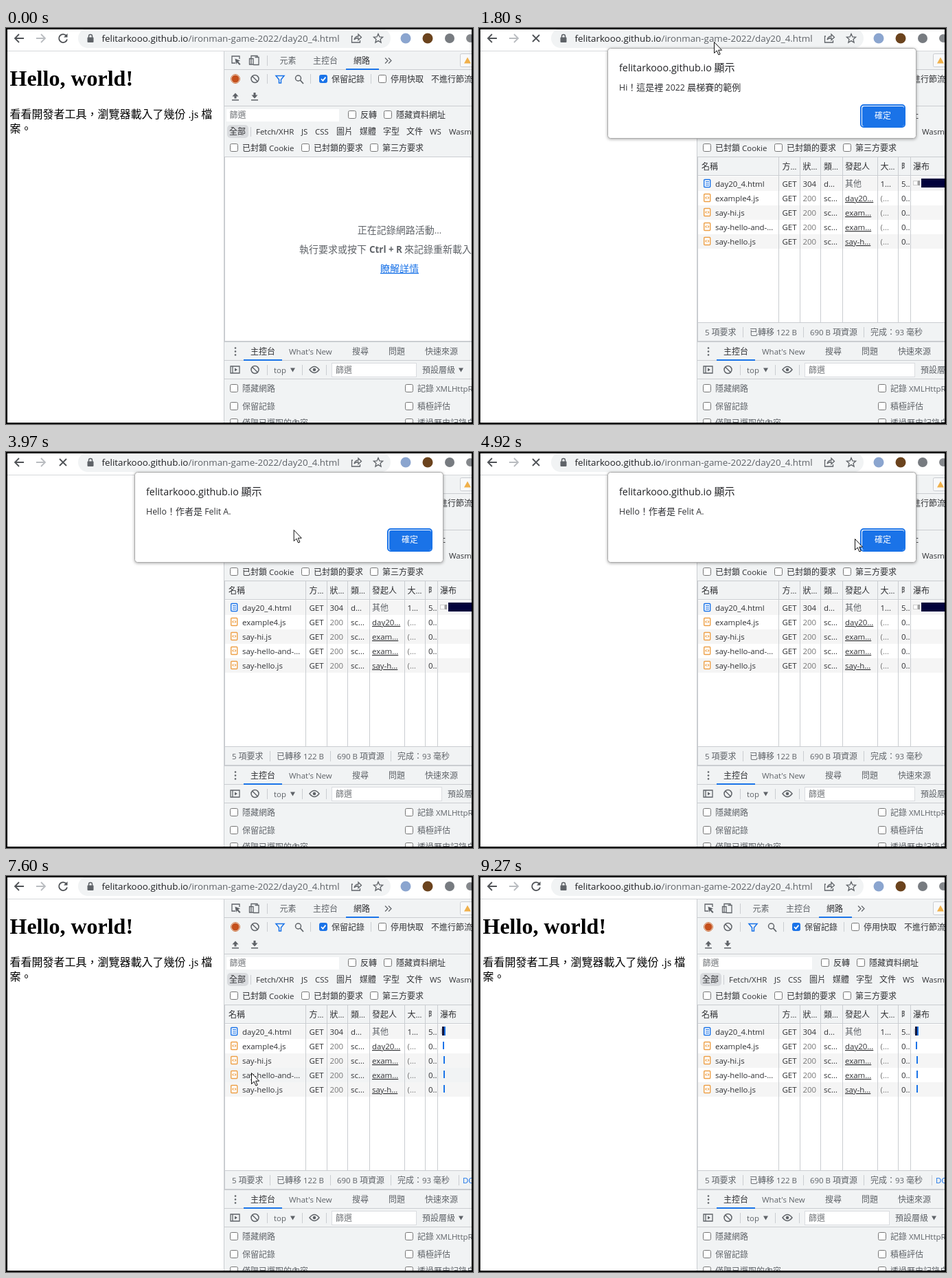
An HTML page that plays this animation: 680x576 px, repeating every 9.75 s.

```html
<!DOCTYPE html>
<html lang="zh-Hant">
<head>
<meta charset="utf-8">
<title>Network panel demo</title>
<style>
  html, body { margin: 0; width: 100%; height: 100%; overflow: hidden; background: #fff; }
  svg { display: block; }
  text { white-space: pre; font-family: "Noto Sans CJK TC", "Noto Sans CJK", sans-serif; }
  tspan { font-family: "Open Sans", "Noto Sans", sans-serif; font-size: .955em; }
  .serif tspan { font-family: "Liberation Serif", serif; font-size: 1em; }
</style>
</head>
<body>
<svg id="stage" width="680" height="576" viewBox="0 0 680 576"></svg>
<script>
const LOOP = 9750;
const BAR = '#f1f3f4', LINE = '#cacdd1', INK = '#303134', GREY = '#5f6368', BLUE = '#1a73e8';
const HOST = 'felitarkooo.github.io';

// Latin runs get their own face and a slightly smaller size
const text = (x, y, s, fill = INK, size = 12, extra = '') =>
  `<text x="${x}" y="${y}" fill="${fill}" font-size="${size}" ${extra}>` +
  s.replace(/[ -~…]+/g, '<tspan>$&</tspan>') + '</text>';
const rect = (x, y, w, h, fill, extra = '') =>
  `<rect x="${x}" y="${y}" width="${w}" height="${h}" fill="${fill}" ${extra}/>`;
const path = (d, stroke = GREY, width = 1.4, extra = 'fill="none"') =>
  `<path d="${d}" stroke="${stroke}" stroke-width="${width}" ${extra}/>`;
const solid = (d, fill = GREY) => path(d, 'none', 0, `fill="${fill}"`);
const dot = (x, y, r, fill, extra = '') => `<circle cx="${x}" cy="${y}" r="${r}" fill="${fill}" ${extra}/>`;
const ring = (x, y, r, stroke = GREY, width = 1.5) =>
  dot(x, y, r, 'none', `stroke="${stroke}" stroke-width="${width}"`);
const group = (id, ...parts) => `<g id="${id}">${parts.join('')}</g>`;
const vline = (x, y, h) => rect(x, y, 1, h, LINE);
const hline = (y, h = 1) => rect(318, y, 360, h, LINE);
const noEntry = (x, y) => ring(x, y, 5.5) + path(`M${x - 4} ${y - 4}l8 8`);

const check = (x, y, label, on, fill = INK) =>
  rect(x + .5, y - 5.5, 11, 11, on ? BLUE : '#fff', `rx="2" stroke="${on ? BLUE : '#767676'}"`) +
  (on ? path(`M${x + 3} ${y}l2.4 2.6 4-5`, '#fff', 1.7) : '') +
  text(x + 18, y + 4.5, label, fill);

function toolbar() {
  return rect(2, 2, 676, 31, '#fff') + rect(2, 33, 676, 1, '#d6d8db') +
    rect(105, 1, 455, 28, BAR, 'rx="14" id="pill"') +
    path('M26 15H13m6-6l-6 6 6 6', '#4f5256', 1.8) +
    path('M44 15h13m-6-6l6 6-6 6', '#b9bcc0', 1.8) +
    group('reload', path('M88 11.5a6 6 0 1 0 1 5', '#4f5256', 1.8), solid('M89.5 8v5.5h-5.5z', '#4f5256')) +
    group('stop', path('M78 10l10 10m0-10l-10 10', '#4f5256', 1.8)) +
    rect(118.5, 13.5, 9, 7.5, GREY, 'rx="1"') + path('M120.5 14v-2a2.5 2.5 0 0 1 5 0v2', GREY, 1.5) +
    text(139.5, 20, HOST, '#202124', 14) +
    text(265.5, 20, '/ironman-game-2022/day20_4.html', GREY, 14) +
    path('M505 12h-1.5v9h12v-3M507 17q1-5 6-5v-3l4.5 4.5-4.5 4v-3q-4 0-6 2.5z', GREY, 1.3) +
    path('M542 8.5l1.9 4.4 4.7.4-3.6 3.1 1.1 4.7-4.1-2.5-4.1 2.5 1.1-4.7-3.6-3.1 4.7-.4z', GREY, 1.3) +
    dot(582, 15, 7.5, '#8ba5cf') + dot(614, 15, 7.5, '#6b431d') +
    dot(646, 15, 7, '#777b80') + dot(676, 15, 6, '#85888c');
}

function page() {
  return text(5.5, 84, 'Hello, world!', '#000', 32, 'class="serif" font-weight="700"') +
    text(5.5, 131, '看看開發者工具，瀏覽器載入了幾份 .js 檔', '#000', 16, 'class="serif"') +
    text(5.5, 152, '案。', '#000', 16);
}

function panel() {
  let s = rect(317, 34, 361, 540, BAR) + rect(319, 188, 359, 268, '#fff');
  // tabs
  s += path('M334 51h-5v-10h11v4', GREY, 1.3) + solid('M333.5 44.5l7.5 3-3 1.3 3.5 3.7-1.5 1.4-3.5-3.7-1.4 2.8z') +
    path('M357 52.5v-12h9v2M354.5 44.5h5.5v8.5h-5.5zM362.5 42.5h5.5v11h-8', GREY, 1.3) + vline(380, 40, 15) +
    text(398.5, 52, '元素', GREY) + text(447, 52, '主控台', GREY) + text(506, 52, '網路') +
    path('M552 43.5l4 4-4 4m5-8l4 4-4 4', GREY, 1.2) +
    rect(661.5, 37.5, 30, 19, '#f8f9fa', `stroke="${LINE}" rx="2"`) +
    solid('M672 42.5l5 9h-10z', '#f0b04a') + hline(60) + rect(495, 59, 48, 2, BLUE);
  // record bar
  s += dot(334, 74, 5.5, '#c5501c') + ring(334, 74, 6.5, '#d2763f', 1) + noEntry(362.5, 74) + vline(380, 67, 14) +
    path('M393 69.5h12l-4.5 5.5v5h-3v-5z', BLUE, 1.5) + ring(425.5, 73, 4) + path('M428.5 76l4.5 5', GREY, 1.8) + vline(443, 67, 14) +
    check(456, 74, '保留記錄', true) + vline(531, 67, 14) + check(542, 74, '停用快取') + text(619, 78.5, '不進行節流') +
    solid('M334 94.5l4.5 5h-3v3h-3v-3h-3z') + rect(329, 104, 10, 1.5, GREY) +
    solid('M362 102.5l4.5-5h-3v-3.5h-3v3.5h-3z') + rect(357, 104, 10, 1.5, GREY) + hline(113);
  // filters
  s += rect(321, 118, 164, 18, '#fff') + text(325.5, 131, '篩選', '#707377') +
    check(498, 126, '反轉') + check(550, 126, '隱藏資料網址') +
    rect(322, 141, 31, 19, '#d9dbde', 'rx="5"') + text(325, 155, '全部') + vline(356, 144, 14);
  [[364, 'Fetch/XHR'], [430, 'JS'], [450, 'CSS'], [481, '圖片'], [515, '媒體'], [549, '字型'], [583, '文件'], [617, 'WS'], [645, 'Wasm']]
    .forEach(([x, label]) => s += text(x, 155, label));
  s += check(326, 174, '已封鎖 Cookie') + check(430, 174, '已封鎖的要求') + check(530, 174, '第三方要求') + hline(187);
  // drawer
  s += hline(455, 2) + [465.5, 470.5, 475.5].map(y => dot(334, y, 1.3, GREY)).join('') +
    text(356, 475, '主控台') + text(412, 475, "What's New", GREY) + text(504, 475, '搜尋', GREY) +
    text(557, 475, '問題', GREY) + text(610, 475, '快速來源', GREY) + hline(483) + rect(346, 482, 56, 2, BLUE) +
    path('M327 492h13v10h-13zM330 492v10', GREY, 1.3) + solid('M333 494.5l4 2.5-4 2.5z') + noEntry(362.5, 497) +
    vline(380, 490, 15) + text(390, 501.5, 'top', GREY) + solid('M414 494.5h7l-3.5 6z') + vline(431, 490, 15) +
    path('M442 497q7-9 14 0q-7 9-14 0z', GREY, 1.5) + dot(449, 497, 2.3, GREY) + vline(466, 490, 15) +
    rect(474.5, 487.5, 123, 20, '#fff', 'stroke="#dadce0" id="field"') + text(480, 502, '篩選', '#707377') +
    group('level', text(606, 501.5, '預設層級', GREY), solid('M659 494.5h7l-3.5 6z')) + hline(510);
  [['隱藏網路', '記錄 XMLHttpRequest'], ['保留記錄', '積極評估'], ['僅限已選取的內容', '透過歷史記錄自動']]
    .forEach(([left, right], i) => s += check(326, 524 + 26 * i - (i > 1 ? 2 : 0), left, false, GREY) +
      check(581, 524 + 26 * i - (i > 1 ? 2 : 0), right, false, GREY));
  return s + rect(317, 34, 1, 540, LINE) + rect(318, 187, 1, 269, LINE);
}

function emptyHint() {
  const mid = 'text-anchor="middle"';
  return text(573, 299, '正在記錄網路活動…', GREY, 14, mid) +
    text(427, 327, '執行要求或按下', GREY, 14) + text(529, 327, 'Ctrl + R', GREY, 14, 'font-weight="700"') +
    text(580, 327, '來記錄重新載入', GREY, 14) +
    text(573, 355, '瞭解詳情', BLUE, 14, mid + ' text-decoration="underline"');
}

function table() {
  const cols = [[324, '名稱'], [441.5, '方…'], [471.5, '狀…'], [502, '類…'], [533, '發起人'], [584.5, '大…'], [615, '時'], [632, '瀑布']];
  const rows = [['day20_4.html', '其他'], ['example4.js', 'day20…'], ['say-hi.js', 'exam…'], ['say-hello-and-…', 'exam…'], ['say-hello.js', 'say-h…']];
  const foot = [[329, '5 項要求'], [394, '已轉移 122 B'], [482, '690 B 項資源'], [570, '完成：93 毫秒']];
  let stripes = '', cells = '';
  rows.forEach(([name, by], i) => {
    const y = 226 + 21 * i, base = y + 5, doc = i === 0, dim = doc ? INK : '#777';
    const tint = doc ? BLUE : '#eda047';
    if (i % 2 === 0) stripes += rect(319, y - 10, 359, 21, '#f5f5f5');
    cells += rect(327.7, y - 5.5, 9, 11, '#fff', `rx="1" stroke="${tint}" stroke-width="1.4"`) +
      (doc ? path(`M330 ${y - 2.5}h5m-5 2.5h5m-5 2.5h5`, tint, 1.1)
           : path(`M331.5 ${y - 1.7}l-1.7 1.7 1.7 1.7m1.5-3.4l1.7 1.7-1.7 1.7`, tint, 1.1)) +
      text(344, base, name) + text(441.5, base, 'GET') + text(471.5, base, doc ? '304' : '200', dim) +
      text(502, base, doc ? 'd…' : 'sc…') +
      text(533, base, by, doc ? GREY : INK, 12, doc ? '' : 'text-decoration="underline"') +
      text(584.5, base, doc ? '1…' : '(…', dim) + text(615, base, doc ? '5..' : '0..');
  });
  return rect(319, 188, 359, 26, BAR) + cols.map(([x, label]) => text(x, 206, label)).join('') +
    rect(620, 190, 7, 22, BAR) + hline(214) +
    stripes + rect(319, 0, 359, 21, BAR, 'id="hover"') + cells +
    [436, 467, 497, 529, 580, 610, 628].map(x => vline(x, 188, 240)).join('') +
    rect(319, 429, 359, 26, BAR) + hline(428) +
    foot.map(([x, label]) => text(x, 447, label, GREY)).join('') +
    [384, 472, 560].map(x => vline(x, 435, 15)).join('') +
    group('pending', rect(632.5, 222.5, 6, 6, '#fff', 'stroke="#ccc"'), rect(639, 222, 3, 7, '#a0a0a0'), rect(644, 219, 34, 13, '#02023c')) +
    group('finished', rect(633, 222, 2, 8, '#d5d7d9'), rect(635, 219, 3, 13, '#10143c'), rect(638, 219, 2, 13, BLUE),
      ...[1, 2, 3, 4].map(i => rect(Math.min(635 + i, 637), 220 + 21 * i, 2, 11, BLUE)),
      vline(659, 435, 15), text(665, 447, 'DOMContentLoaded', BLUE));
}

function dialog() {
  return rect(187.5, 29.5, 449, 131, '#fff', 'rx="4" stroke="#aaa" style="filter:drop-shadow(0 1px 2px #0005)"') +
    text(204, 63, HOST + ' 顯示', '#202124', 15) +
    group('first', text(204, 91, 'Hi！這是裡 2022 晨梯賽的範例', INK, 13)) +
    group('second', text(204, 91, 'Hello！作者是 Felit A.', INK, 13)) +
    rect(556, 112, 64, 32, '#fff', `rx="4" stroke="${BLUE}" stroke-width="2"`) +
    rect(558, 114, 61, 29, BLUE, 'rx="3" id="button"') + text(576, 132, '確定', '#fff');
}

const pointer = group('pointer',
  group('press', dot(1, 0, 13, '#fbd75b', 'opacity=".3"'), dot(1, 0, 10.5, '#f0ac48', 'opacity=".52"')),
  group('arrow', path('M.5 .5v16l3.7-3.5 2.7 6 2.3-1-2.6-5.8h5z', '#111', 1, 'fill="#fff"')),
  group('beam', path('M-3-7h3m1 0h3M.5-7v15M-3 8h3m1 0h3', '#333', 1.2)));

stage.innerHTML = rect(0, 0, 680, 576, '#fff') + group('page', page()) + panel() + group('hint', emptyHint()) +
  group('table', table()) + toolbar() + group('dialog', dialog()) + pointer +
  rect(1, 1, 678, 574, 'none', 'stroke="#000" stroke-width="2"');

// time, x, y of the pointer
const track = [
  [140, 588, 462], [860, 342, 21], [1670, 342, 21], [1690, 342, 20], [2200, 342, 20], [3130, 564, 125], [3400, 564, 125],
  [4370, 334, 106], [4400, 334, 106], [4915, 547, 126], [4985, 547, 126], [5130, 564, 125], [5250, 564, 125],
  [6020, 500, 121], [6310, 500, 121], [6780, 350, 322], [6930, 350, 322], [7120, 333, 321], [7340, 333, 321],
  [7595, 357, 286], [7665, 357, 286], [7810, 362, 263], [7890, 362, 263], [8500, 350, 307], [8580, 350, 307], [9270, 690, 590]
];

function pointerAt(t) {
  const i = track.findIndex(k => k[0] > t);
  const [t0, x0, y0] = track[i - 1], [t1, x1, y1] = track[i];
  const u = (t - t0) / (t1 - t0), e = u * u * (3 - 2 * u);
  return [x0 + (x1 - x0) * e, y0 + (y1 - y0) * e];
}

const el = id => document.getElementById(id);
const show = (id, on) => el(id).style.display = on ? '' : 'none';
const within = (t, a, b) => t >= a && t < b;

function draw(t) {
  const loading = within(t, 1670, 5270), loaded = t >= 5270;
  const visible = within(t, 140, 9270);
  const [x, y] = visible ? pointerAt(t) : [-50, -50];
  const onUrl = visible && t < 1670 && y < 30;

  show('page', !loading);
  show('reload', !loading);
  show('stop', loading);
  show('hint', t < 1670);
  show('table', t >= 1735);
  show('pending', loading);
  show('finished', loaded);
  show('dialog', within(t, 1800, 5270));
  show('first', t < 3420);
  show('second', t >= 3420);
  el('field').setAttribute('width', loading ? 160 : 123);
  el('level').setAttribute('transform', `translate(${loading ? 37 : 0})`);
  el('pill').setAttribute('fill', onUrl ? '#f6e9eb' : BAR);
  el('button').setAttribute('fill', x > 556 && within(y, 112, 144) ? '#4a90e0' : BLUE);

  const row = Math.floor((y - 216) / 21);
  show('hover', loaded && x > 319 && row >= 0 && row < 5);
  el('hover').setAttribute('y', 216 + 21 * row);

  show('pointer', visible);
  show('arrow', !onUrl);
  show('beam', onUrl);
  show('press', within(t, 905, 1050) || within(t, 3150, 3280) || within(t, 5130, 5270));
  el('pointer').setAttribute('transform', `translate(${x.toFixed(1)} ${y.toFixed(1)})`);
}

function tick() {
  draw(performance.now() % LOOP);
  requestAnimationFrame(tick);
}
tick();
</script>
</body>
</html>
```
